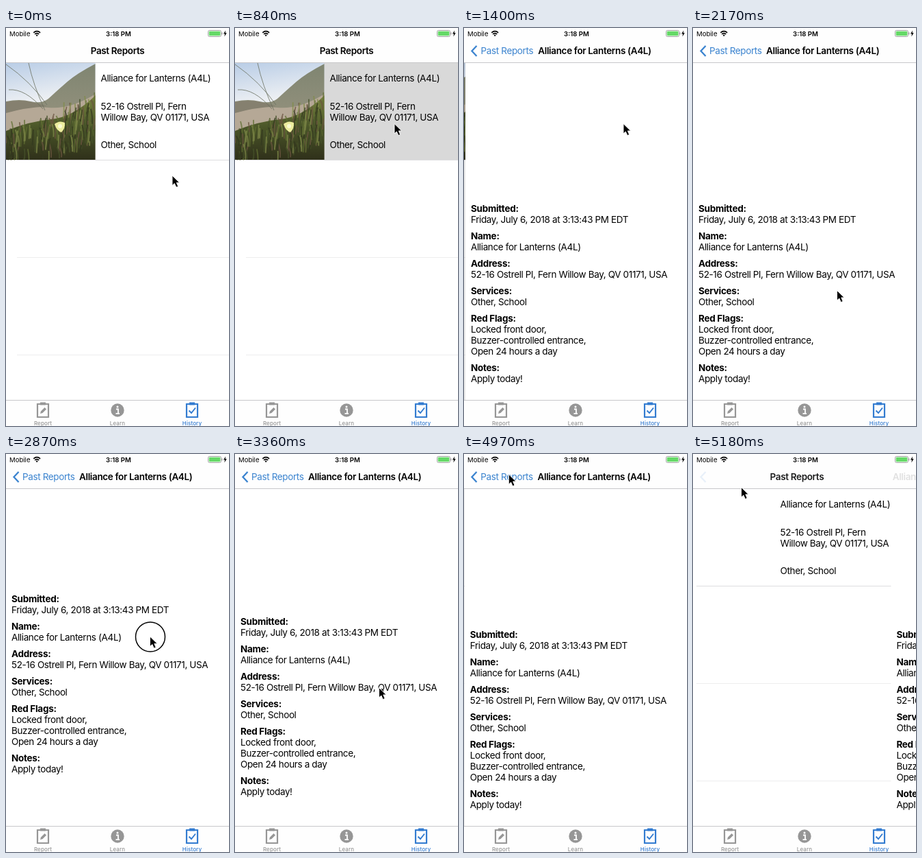
Recreate the animation shown at these times as an HTML page. Size 326 px wide and 580 px high, loop 5250 ms.

```html
<!DOCTYPE html>
<html lang="en">
<head>
<meta charset="utf-8">
<title>Past Reports</title>
<style>
  html, body { margin: 0; width: 100%; height: 100%; overflow: hidden; background: #fff; }
  svg { display: block; width: 326px; height: 580px; }
  text { font: 13.5px Inter, "Liberation Sans", sans-serif; letter-spacing: -.37px; }
  .bold { font-weight: 700; letter-spacing: -.28px; }
  .title { font-weight: 600; letter-spacing: -.35px; }
  .status { font-size: 9.6px; letter-spacing: 0; }
  .clock { font-weight: 600; text-anchor: middle; }
  .tab { font-size: 8px; font-weight: 500; letter-spacing: .1px; text-anchor: middle; }
  .line { stroke: #ededee; }
  .bar { fill: #fefefe; }
  .edge { stroke: #c8c8ca; }
</style>
</head>
<body>
<svg viewBox="0 0 326 580">
  <defs>
    <linearGradient id="sky" x2=".3" y2="1">
      <stop stop-color="#b9cde6"/><stop offset=".8" stop-color="#eceff3"/>
    </linearGradient>
    <linearGradient id="hill" x2="0" y2="1">
      <stop stop-color="#7f8571"/><stop offset="1" stop-color="#a39a86"/>
    </linearGradient>
    <linearGradient id="grass" x2="0" y2="1">
      <stop stop-color="#77823f"/><stop offset=".5" stop-color="#4a5528"/><stop offset="1" stop-color="#2f301a"/>
    </linearGradient>
    <clipPath id="frame"><path d="M0 51H130.500V192.500H0Z"/></clipPath>
    <g id="board" fill="none" stroke="currentColor">
      <path d="M-8 -9H8V10H-8Z" stroke-width="2.200"/>
      <path d="M-4 -9.500H4" stroke-width="4"/>
    </g>
  </defs>

  <g id="list">
    <path id="picked" d="M0 51H326V192H0Z" fill="#d9d9d9"/>
    <g id="photo" clip-path="url(#frame)">
      <path d="M0 51H131V120H0Z" fill="url(#sky)"/>
      <path d="M0 107Q20 103 36 107T62 103Q76 90 90 78T131 52V192H0Z" fill="url(#hill)"/>
      <path d="M0 118Q30 113 62 116T131 96V150H0Z" fill="#b5a896"/>
      <path d="M0 108Q20 104 38 108T60 114Q28 116 0 124Z" fill="#85806f"/>
      <path d="M0 150Q34 136 66 133T131 98V192H0Z" fill="url(#grass)"/>
      <g id="blades" fill="none" stroke-width="1.800" opacity=".75"></g>
      <path d="M0 53Q36 78 60 112M33 51Q40 84 57 120M4 90Q28 88 54 118" fill="none" stroke="#6a7060" stroke-width=".8"/>
      <path d="M71 140Q78 134 86 138Q87 146 81 152Q74 150 71 140Z" fill="#ecec9e"/>
      <circle cx="79" cy="143" r="3" fill="#fafad2"/>
    </g>
    <path class="line" d="M16 334.500H326M16 476.500H326"/>
    <path d="M16 192.500H326" stroke="#dedee0"/>
    <g id="cell"></g>
  </g>
  <path id="dim" d="M0 51H326V542H0Z"/>
  <g id="detail">
    <path d="M0 51H326V542H0Z" fill="#fff"/>
    <g id="info"></g>
  </g>

  <path class="bar" d="M0 0H326V50H0Z"/>
  <path class="edge" d="M0 50.500H326"/>
  <text class="status" x="5" y="11.500">Mobile</text>
  <g fill="none" stroke="#000" stroke-width="1.700">
    <path d="M40.300 6.800Q45.200 2.400 50.100 6.800M42.200 9Q45.200 6.300 48.200 9"/>
    <path d="M45.200 9.600V11.800" stroke-width="2"/>
  </g>
  <text class="status clock" x="164.500" y="11.500">3:18 PM</text>
  <rect x="295.500" y="3.500" width="19" height="9" rx="2" fill="#fff" stroke="#8d8d8d" stroke-width=".8"/>
  <rect x="296.700" y="4.700" width="16.600" height="6.600" rx="1" fill="#65d967"/>
  <path d="M316 6.500V9.500" stroke="#8d8d8d"/>
  <path d="M321 3.500L318 8.600H320L319.300 12.500L322.700 7.200H320.600Z"/>

  <text id="home" class="title" x="163" y="38" text-anchor="middle">Past Reports</text>
  <path id="chevron" d="M18.500 26L11.500 33.500L18.500 41" fill="none" stroke="#3a83cf" stroke-width="2.300"/>
  <text id="back" x="24" y="38" fill="#3a83cf">Past Reports</text>
  <text id="name" class="title" x="107" y="38"></text>

  <path class="bar" d="M0 542H326V580H0Z"/>
  <path class="edge" d="M0 542.500H326"/>
  <g color="#969696" fill="#969696">
    <use href="#board" x="54" y="557"/>
    <path d="M50 562L51 558.500L56.500 553L59 555.500L53.500 561Z"/>
    <text class="tab" x="54" y="578.500">Report</text>
    <circle cx="163" cy="557" r="9.700"/>
    <path d="M161 555.500H164V561.500M160.500 561.800H166" stroke="#fff" stroke-width="1.800" fill="none"/>
    <circle cx="163" cy="552" r="1.500" fill="#fff"/>
    <text class="tab" x="163" y="578.500">Learn</text>
  </g>
  <g color="#327bd0" fill="#327bd0">
    <use href="#board" x="272" y="557"/>
    <path d="M267.500 557.500L271 561L277 553.500" fill="none" stroke="#327bd0" stroke-width="1.900"/>
    <text class="tab" x="272" y="578.500">History</text>
  </g>

  <g id="pointer">
    <circle id="ring" r="21.500" fill="none" stroke="#000" stroke-width="1.500"/>
    <path d="M-.5 -.5V14L2.800 11L5.300 16.600L8.200 15.400L5.800 9.900H10.200Z" stroke="#fff" stroke-width=".9"/>
  </g>
</svg>
<script>
const $ = id => document.getElementById(id);
const LOOP = 5250, WIDTH = 326, PRESS_Y = 386, RELEASE = 3330;
const org = "Alliance for Lanterns (A4L)";
const street = "52-16 Ostrell Pl, Fern", city = "Willow Bay, QV 01171, USA";
const services = "Other, School";

const line = (x, y, s, cls = "") => `<text class="${cls}" x="${x}" y="${y}">${s}</text>`;

$("name").textContent = org;
$("cell").innerHTML = line(138.5, 78, org) + line(138.5, 119, street) +
  line(138.5, 135, city) + line(138.5, 175, services);

const fields = [
  ["Submitted:", "Friday, July 6, 2018 at 3:13:43 PM EDT"],
  ["Name:", org],
  ["Address:", street + " " + city],
  ["Services:", services],
  ["Red Flags:", "Locked front door,", "Buzzer-controlled entrance,", "Open 24 hours a day"],
  ["Notes:", "Apply today!"]
];
let y = 268, rows = "";
for (const field of fields) {
  field.forEach((s, i) => { rows += line(8, y, s, i ? "" : "bold"); y += 16; });
  y += 8;
}
$("info").innerHTML = rows;

// Seeded grass
let seed = 7;
const rnd = () => (seed = seed * 16807 % 2147483647) / 2147483647;
const greens = ["#46522a", "#616f33", "#828c4a", "#33381f", "#6b5540"];
let blades = "";
for (let i = 0; i < 170; i++) {
  const x = rnd() * 134, top = 150 - x * .35, by = top + rnd() * 60 + 10, h = 12 + rnd() * 14;
  blades += `<path d="M${x} ${by}q1 ${-h / 2} ${rnd() * 8 - 4} ${-h}" stroke="${greens[i % 5]}"/>`;
}
$("blades").innerHTML = blades;

// Pointer path: time, x, y
const path = [
  [455, 243.5, 215.5], [665, 233.5, 140], [1785, 233.5, 140],
  [2170, 211, 383], [2275, 211, PRESS_Y], [2345, 211, PRESS_Y],
  [2870, 211, 266.5], [2905, 211, 266.5], [RELEASE, 211, 341],
  [3815, 211, 341], [4130, 71, 58], [4340, 65.5, 29],
  [4935, 65.5, 29], [5180, 71, 49]
];
const presses = [[665, 805], [2275, RELEASE], [4400, 4540]];

function pointerAt(t) {
  const i = path.findIndex(k => k[0] > t);
  if (i < 1) return (i ? path[path.length - 1] : path[0]).slice(1);
  const a = path[i - 1], b = path[i], u = (t - a[0]) / (b[0] - a[0]), e = u * u * (3 - 2 * u);
  return [a[1] + (b[1] - a[1]) * e, a[2] + (b[2] - a[2]) * e];
}

// Remaining share of a critically damped spring
function rest(ms, w) {
  const x = Math.max(0, ms) / 1000 * w;
  return (1 + x) * Math.exp(-x);
}

function scrollAt(t) {
  if (t < 2275) return 0;
  const pull = (PRESS_Y - pointerAt(Math.min(t, RELEASE))[1]) * .55;
  return -pull / (pull / 245 + 1) * rest(t - RELEASE, 22);
}

const move = (id, x, y = 0) => $(id).setAttribute("transform", `translate(${x} ${y})`);
const fade = (id, a) => $(id).setAttribute("opacity", a);

function draw(t) {
  const hidden = t < 4900 ? rest(t - 990, 17.5) : 1 - rest(t - 4967, 17.5);
  const shown = 1 - hidden;
  move("list", -.3 * WIDTH * shown);
  move("detail", WIDTH * hidden);
  move("info", 0, scrollAt(t));
  fade("dim", .1 * shown * shown);
  fade("photo", t < 2000 ? 1 : 0);
  fade("picked", t >= 735 && t < 2000 ? 1 : 0);

  move("home", -99 * shown);
  fade("home", hidden);
  move("back", 99 * hidden);
  fade("back", shown * shown);
  fade("chevron", shown);
  move("name", 208 * hidden);
  fade("name", shown);

  move("pointer", ...pointerAt(t));
  fade("ring", presses.some(([a, b]) => t >= a && t < b) ? 1 : 0);
}

const start = performance.now();
function tick() {
  draw((performance.now() - start) % LOOP);
  requestAnimationFrame(tick);
}
tick();
</script>
</body>
</html>
```
